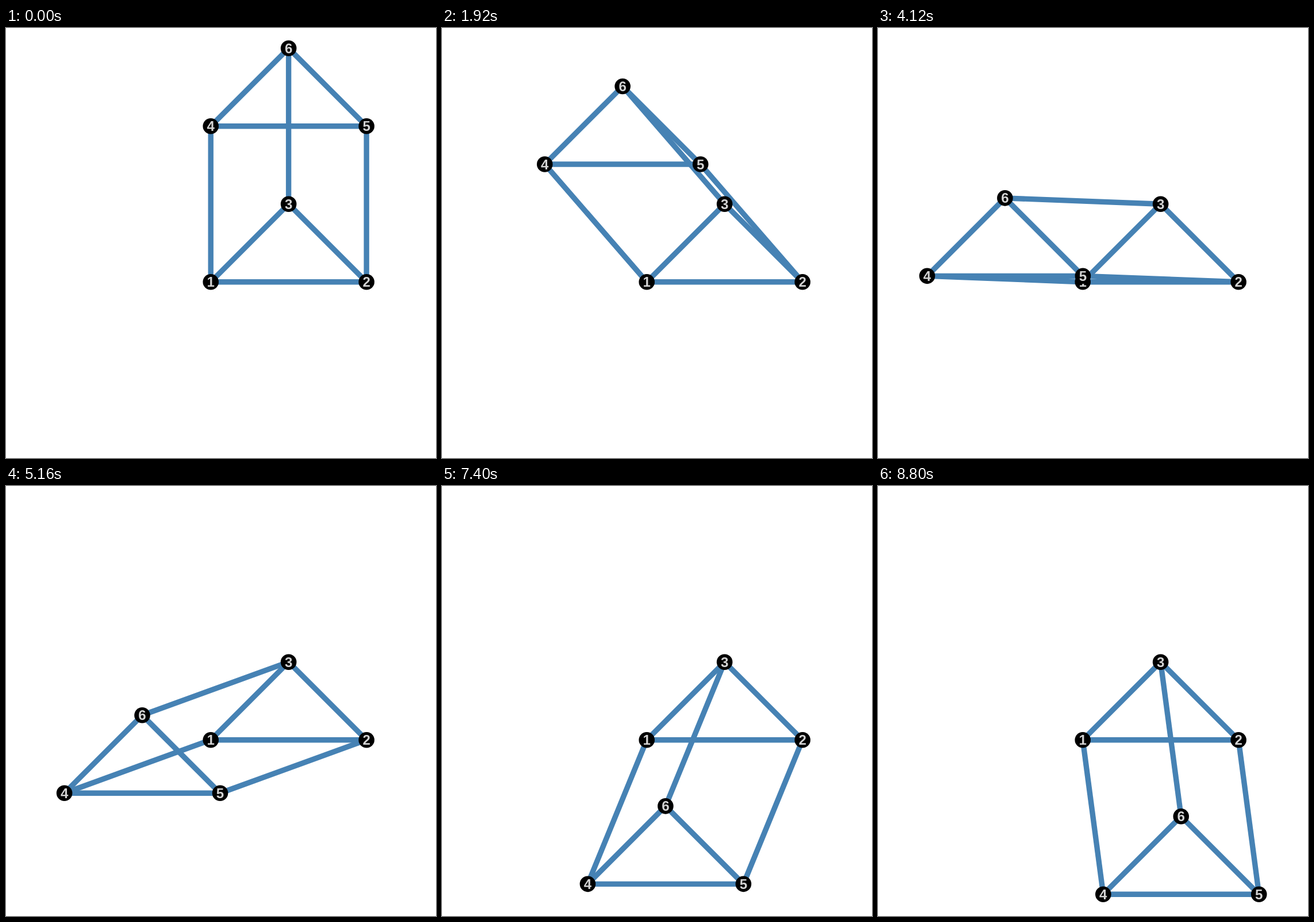
Write an HTML page that moves like this. It is 748 by 748 pixels and loops after 8840 ms.

```html
<!DOCTYPE html>
<html lang="en">
<head>
<meta charset="utf-8">
<title>Rotating prism graph</title>
<style>
  html, body { margin: 0; width: 100%; height: 100%; overflow: hidden; background: #fff; }
  svg { display: block; width: 100vw; height: 100vh; }
  line { stroke: steelblue; stroke-width: 9.4; }
  text {
    font: bold 24px "Liberation Sans", Arial, sans-serif;
    fill: lightgray;
    text-anchor: middle;
  }
</style>
</head>
<body>
<svg viewBox="0 0 748 748"></svg>
<script>
const STEP_MS = 40, STEPS = 221, DEG_PER_STEP = 0.8525, RADIUS = 270.9;
const base = [[356.2, 441.7], [627.1, 441.7], [491.6, 306.2]];
const edges = [[0, 1], [1, 2], [2, 0], [3, 4], [4, 5], [5, 3], [0, 3], [1, 4], [2, 5]];
const svg = document.querySelector("svg");

function add(tag, parent, attrs = {}) {
  const el = document.createElementNS("http://www.w3.org/2000/svg", tag);
  set(el, attrs);
  return parent.appendChild(el);
}

function set(el, attrs) {
  for (const key in attrs) el.setAttribute(key, attrs[key]);
}

const lines = edges.map(() => add("line", svg));
const nodes = Array.from({ length: 6 }, (_, i) => {
  const g = add("g", svg);
  add("circle", g, { r: 13.8 });
  add("text", g, { y: 8.5 }).textContent = i + 1;
  return g;
});

function draw(time) {
  const step = Math.floor(time / STEP_MS) % STEPS;
  const angle = step * DEG_PER_STEP * Math.PI / 180;
  const dx = -RADIUS * Math.sin(angle);
  const dy = -RADIUS * Math.cos(angle);
  const points = [...base, ...base.map(([x, y]) => [x + dx, y + dy])];

  nodes.forEach((g, i) => set(g, { transform: `translate(${points[i]})` }));
  lines.forEach((line, i) => {
    const [[x1, y1], [x2, y2]] = edges[i].map(n => points[n]);
    set(line, { x1, y1, x2, y2 });
  });
}

const start = performance.now();
function tick() {
  draw(performance.now() - start);
  requestAnimationFrame(tick);
}
tick();
</script>
</body>
</html>
```
